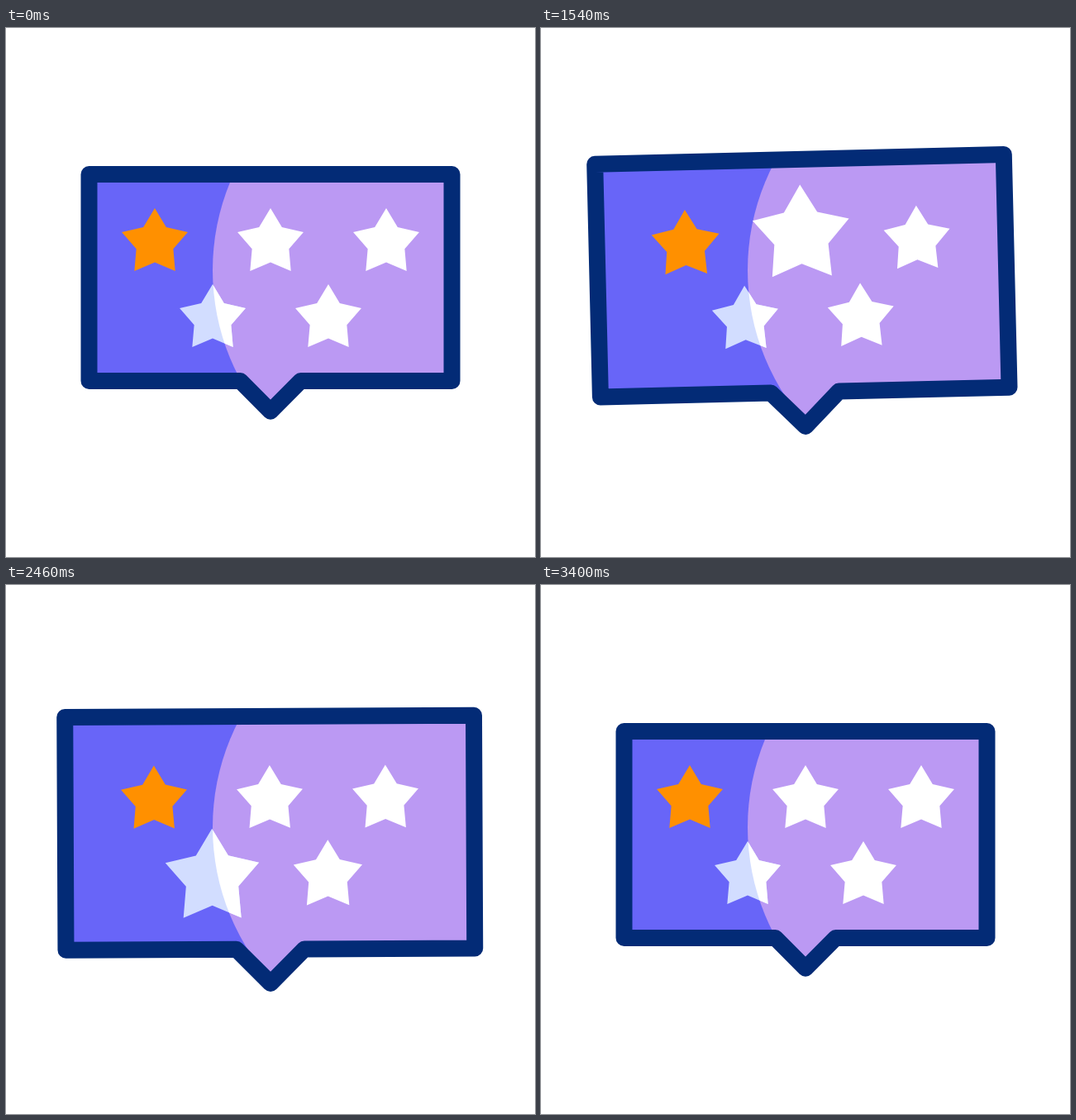
These frames come from a looping animation (640x640 px, 3.6 s). An HTML page with a canvas:

```html
<!DOCTYPE html>
<html lang="en">
<head>
<meta charset="utf-8">
<title>Star rating bubble</title>
<style>
  html, body { margin: 0; width: 100%; height: 100%; overflow: hidden; background: #fff; }
  canvas { display: block; width: 640px; height: 640px; }
</style>
</head>
<body>
<canvas id="stage" width="640" height="640"></canvas>
<script>
const ctx = document.getElementById('stage').getContext('2d');
const LOOP = 3600;
const PIVOT = { x: 320, y: 474 };
const NAVY = '#032b76', BLUE = '#6865f8', PURPLE = '#bb99f3';
const ORANGE = '#ff9000', PALE = '#d2ddff', CORAL = '#ff6156', WHITE = '#fff';

// [time in ms, value]
const TILT = [[60, 0], [605, -4.1], [995, 4.2], [1395, -4.1], [1795, 4.2],
              [2195, -4.1], [2795, 4.9], [3400, 0]];
const GROW = [[60, 1], [605, 1.127], [2795, 1.127], [3400, 1]];

// Each pulse: peak time, rise time, how far above the centre it grows
const STARS = [
  { x: 180, y: 260, color: ORANGE, pulses: [[390, 330, -5], [1190, 400, 19]] },
  { x: 320, y: 260, color: WHITE, pulses: [[1590, 400, 20]] },
  { x: 460, y: 260, color: WHITE, pulses: [[1990, 400, 21]] },
  { x: 250, y: 352, color: PALE, split: true, pulses: [[2390, 400, -5]] },
  { x: 390, y: 352, color: WHITE, pulses: [[2790, 400, -5]] }
];

// Centre and outward direction
const TICKS = [[154.3, 189.3, -0.46, -0.89], [124, 288, -0.86, 0.51]];

const clamp = v => Math.min(1, Math.max(0, v));
const soft = u => u / 2 + (1 - Math.cos(Math.PI * u)) / 4;

function track(keys, t) {
  if (t <= keys[0][0]) return keys[0][1];
  for (let i = 1; i < keys.length; i++) {
    const [t0, a] = keys[i - 1], [t1, b] = keys[i];
    if (t < t1) return a + (b - a) * soft((t - t0) / (t1 - t0));
  }
  return keys[keys.length - 1][1];
}

function bubblePath(s) {
  const corners = [[-219.5, -143], [219.5, -143], [219.5, 107], [36.5, 107],
                   [0, 143.7], [-36.5, 107], [-219.5, 107]];
  const path = new Path2D();
  corners.forEach(([x, y]) => path.lineTo(320 + x * s, 320 + y * s));
  path.closePath();
  return path;
}

function starPath(star, t) {
  let size = 1, y = star.y;
  for (const [peak, rise, lift] of star.pulses) {
    const d = t - peak;
    const k = 0.56 * Math.pow(clamp(1 - (d < 0 ? -d / rise : d / 400)), 1.5);
    size += k;
    y -= k * lift;
  }
  const path = new Path2D();
  for (let i = 0; i < 10; i++) {
    const r = size * (i % 2 ? 23.5 : 42), a = (i * 36 - 90) * Math.PI / 180;
    path.lineTo(star.x + r * Math.cos(a), y + r * Math.sin(a));
  }
  path.closePath();
  return path;
}

function drawTicks(t) {
  const head = clamp((t - 440) / 140), tail = clamp((t - 500) / 140);
  if (head <= tail) return;
  ctx.strokeStyle = CORAL;
  ctx.lineCap = 'round';
  ctx.beginPath();
  for (const [x, y, dx, dy] of TICKS) {
    const a = 30 * tail - 15, b = 30 * head - 15;
    ctx.moveTo(x + dx * a, y + dy * a);
    ctx.lineTo(x + dx * b, y + dy * b);
  }
  ctx.stroke();
}

function draw(t) {
  const bubble = bubblePath(track(GROW, t));
  const angle = track(TILT, t) * Math.PI / 180;
  const hop = -29 * Math.sin(Math.PI * clamp((t - 2795) / 605)) ** 2;

  const pose = () => {
    ctx.translate(PIVOT.x, PIVOT.y + hop);
    ctx.rotate(angle);
    ctx.translate(-PIVOT.x, -PIVOT.y);
  };
  const fill = (path, color) => {
    ctx.fillStyle = color;
    ctx.fill(path);
  };
  // The light disc stays still while the bubble moves
  const fillInDisc = (path, color) => {
    ctx.save();
    ctx.resetTransform();
    ctx.beginPath();
    ctx.arc(529, 293, 279, 0, 2 * Math.PI);
    ctx.clip();
    pose();
    fill(path, color);
    ctx.restore();
  };

  ctx.resetTransform();
  ctx.fillStyle = WHITE;
  ctx.fillRect(0, 0, 640, 640);
  pose();
  ctx.lineWidth = 20;
  ctx.lineJoin = 'round';

  fill(bubble, BLUE);
  fillInDisc(bubble, PURPLE);
  ctx.strokeStyle = NAVY;
  ctx.stroke(bubble);
  drawTicks(t);
  for (const star of STARS) {
    const path = starPath(star, t);
    fill(path, star.color);
    if (star.split) fillInDisc(path, WHITE);
  }
}

const start = performance.now();
function tick() {
  draw((performance.now() - start) % LOOP);
  requestAnimationFrame(tick);
}
tick();
</script>
</body>
</html>
```
